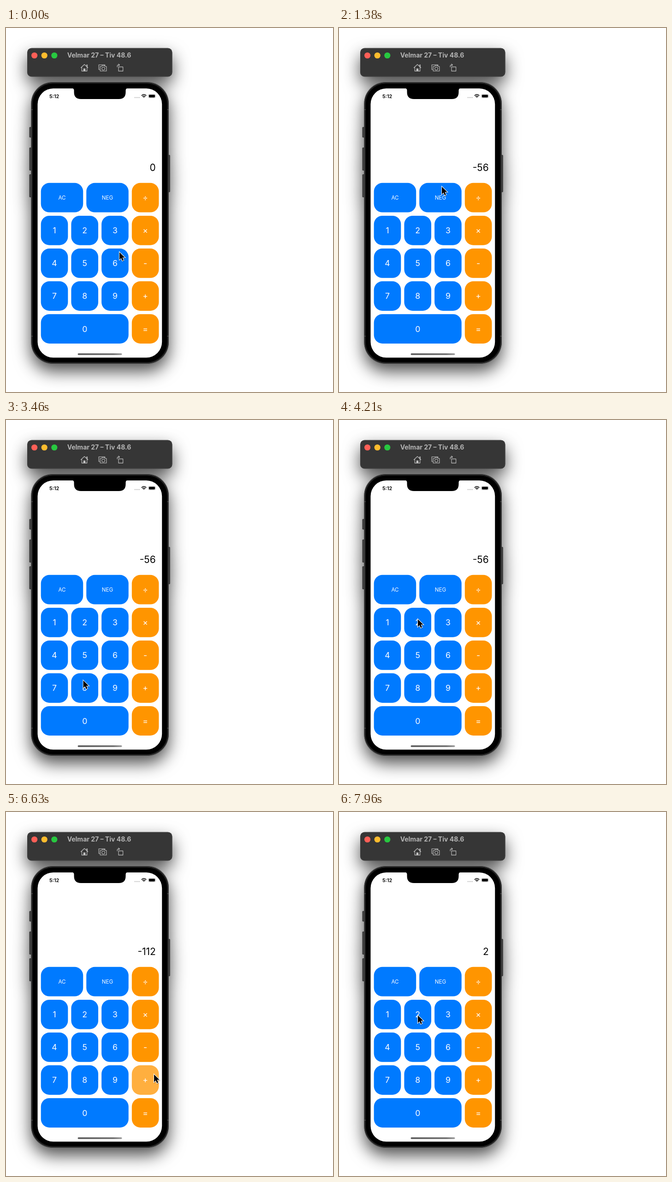
These frames come from a looping animation (709 px wide and 789 px high, 8000 ms). An HTML page:

```html
<!DOCTYPE html>
<html lang="en">
<head>
<meta charset="utf-8">
<title>Calculator</title>
<style>
html, body { margin: 0; width: 100%; height: 100%; overflow: hidden; background: #fff; }
svg { display: block; width: 709px; height: 789px; font-family: Inter, Roboto, sans-serif; }
.key text { fill: #fff; text-anchor: middle; }
.icon { fill: none; stroke: #c4c4c4; stroke-width: 1.1; stroke-linejoin: round; }
</style>
</head>
<body>
<svg viewBox="0 0 709 789">
  <defs>
    <filter id="shadow" filterUnits="userSpaceOnUse" x="-60" y="-20" width="540" height="860">
      <feDropShadow dx="0" dy="16" stdDeviation="18" flood-color="#000" flood-opacity=".7"/>
    </filter>
    <linearGradient id="bar">
      <stop offset="0" stop-color="#555"/>
      <stop offset=".8" stop-color="#6a6a6a"/>
      <stop offset="1" stop-color="#999"/>
    </linearGradient>
  </defs>

  <g filter="url(#shadow)">
    <rect x="46" y="43.5" width="314.5" height="62" rx="9.5" fill="#222"/>
    <g fill="#3c3c3c" stroke="#252525" stroke-width=".8">
      <rect x="51" y="215" width="6" height="22" rx="1"/>
      <rect x="51" y="259.5" width="6" height="49" rx="1"/>
      <rect x="51" y="317.5" width="6" height="49" rx="1"/>
      <rect x="350" y="275.5" width="5.2" height="80" rx="1"/>
    </g>
    <rect x="54.3" y="117" width="298.7" height="611" rx="47" fill="#333"/>
  </g>

  <!-- window bar -->
  <rect x="46.8" y="44.4" width="312.9" height="60.3" rx="8.8" fill="#363636" stroke="#4a4a4a" stroke-width=".8"/>
  <circle cx="61.6" cy="59.5" r="6.6" fill="#ff5f57"/>
  <circle cx="83.2" cy="59.5" r="6.6" fill="#febc2e"/>
  <circle cx="104.8" cy="59.5" r="6.6" fill="#28c840"/>
  <text x="202" y="64" text-anchor="middle" font-size="14" font-weight="700" fill="#b5b5b5">Velmar 27 – Tiv 48.6</text>
  <g class="icon">
    <path d="M162 86.5 170 79 178 86.5M164.3 85V93.4H175.7V85M174.8 83V79.8H176.3V84.4"/>
    <path d="M168.3 93V88.2H171.7V93Z" fill="#c4c4c4"/>
    <path d="M203.6 90H201.2V79.7H214.5V82"/>
    <path d="M204.2 83.2H207.2L208.6 81.4H213.4L214.8 83.2H217.8V93.2H204.2Z"/>
    <circle cx="211" cy="88" r="3.2"/>
    <path d="M244 84.4H253.6V93.4H244ZM241.2 85V82.4Q241.2 80 243.6 80H246M243.6 77.6 246.2 80 243.6 82.4"/>
  </g>

  <!-- phone -->
  <rect x="55" y="117.7" width="297.3" height="609.6" rx="46.3" fill="#000" stroke="#555" stroke-width="1.2"/>
  <rect x="57" y="119.6" width="293.3" height="605.8" rx="44.4" fill="#000" stroke="#252525" stroke-width="1.6"/>
  <path d="M54.3 177H58M349.5 177H353M54.3 668H58M349.5 668H353" stroke="#666"/>
  <rect x="68.5" y="131" width="269.7" height="583.5" rx="34" fill="#fff"/>
  <path d="M143 130.5Q147.5 131 147.5 135.5V139Q147.5 154 162.5 154H244.5Q259.5 154 259.5 139V135.5Q259.5 131 264 130.5Z"/>

  <!-- status row -->
  <text x="94" y="152" font-size="10.8" font-weight="600">5:12</text>
  <path d="M278.6 150.8H290" stroke="#bbb" stroke-width="1.9" stroke-dasharray="1.9 1.2"/>
  <g fill="none" stroke="#000" stroke-width="1.7">
    <path d="M293.8 146.6Q299 141.8 304.2 146.6M295.9 148.8Q299 146 302.1 148.8"/>
    <path d="M297.5 149.8 299 151.6 300.5 149.8Q299 148.7 297.5 149.8Z" fill="#000" stroke="none"/>
  </g>
  <rect x="308.7" y="143.6" width="15.4" height="8" rx="2.4" fill="none" stroke="#aaa" stroke-width=".8"/>
  <rect x="309.9" y="144.8" width="13" height="5.6" rx="1.4"/>
  <path d="M325.1 146.2Q326.2 147.6 325.1 149Z" fill="#aaa"/>

  <text id="display" x="324.6" y="310" text-anchor="end" font-size="20.8">0</text>
  <g id="keys"></g>
  <rect x="155.5" y="705.3" width="96" height="3.5" rx="1.75" fill="url(#bar)"/>

  <g id="cursor">
    <path d="M0 0V16.2L3.7 12.7 6.2 18.6 9 17.4 6.5 11.6H11.7Z" transform="translate(.6 1.6)" fill="#000" opacity=".25" stroke="#000" stroke-width="1.6"/>
    <path d="M0 0V16.2L3.7 12.7 6.2 18.6 9 17.4 6.5 11.6H11.7Z" stroke="#fff" stroke-width="2" paint-order="stroke"/>
  </g>
</svg>
<script>
const LOOP = 8000;
const BLUE = '#007aff', ORANGE = '#ff9500';
const $ = id => document.getElementById(id);
const keys = {};

function addKey(label, x, row, width, size = 17.6) {
  const y = 335.8 + row * 71.1, h = 63.8;
  const color = x > 270 ? ORANGE : BLUE;
  const baseline = y + h / 2 + size * .365;
  $('keys').insertAdjacentHTML('beforeend',
    `<g class="key"><rect x="${x}" y="${y}" width="${width}" height="${h}" rx="18.5" fill="${color}"/>` +
    `<text x="${x + width / 2}" y="${baseline}" font-size="${size}">${label}</text></g>`);
  keys[label] = $('keys').lastChild;
}

const colX = col => 75.7 + col * 65.7;
addKey('AC', colX(0), 0, 91.5, 11.6);
addKey('NEG', 174.2, 0, 91.5, 11.6);
for (let n = 1; n <= 9; n++) addKey(n, colX((n - 1) % 3), Math.ceil(n / 3), 58.6);
addKey(0, colX(0), 4, 190);
[...'÷×-+='].forEach((op, row) => addKey(op, colX(3), row, 58.6));

// time, x, y of the pointer tip
const path = [
  [0, 246, 486], [40, 246, 486], [280, 176, 508], [420, 176, 508], [680, 238, 512],
  [920, 238, 512], [1160, 223, 344], [1710, 223, 344], [2500, 303, 441], [2540, 304, 442],
  [2880, 304, 442], [3500, 166, 566], [3740, 120, 535], [4210, 171, 432], [4380, 171, 432],
  [4760, 300, 645], [4940, 303, 645], [5170, 331, 605], [5210, 381, 527], [5500, 384, 376],
  [6000, 323, 547], [6380, 321, 569], [6720, 321, 569], [7060, 230, 612], [7420, 128, 534],
  [7800, 171, 441], [8000, 171, 441]
];

// key, press time, release time
const presses = [
  [5, 300, 380], [6, 720, 800], ['NEG', 1180, 1260], ['×', 2750, 2830], [2, 4220, 4250],
  ['=', 4800, 4880], ['+', 6620, 6700], [2, 7860, 7900]
];

const readings = [
  [0, '0'], [360, '5'], [790, '56'], [1260, '-56'], [4250, '2'], [4880, '-112'], [7900, '2']
];

const clamp = v => Math.min(1, Math.max(0, v));
const FADE = 60, DIM = .25;

function pointer(t) {
  const i = path.findIndex(p => p[0] > t);
  const [t0, x0, y0] = path[i - 1], [t1, x1, y1] = path[i];
  const u = (t - t0) / (t1 - t0), e = u * u * (3 - 2 * u);
  return [x0 + (x1 - x0) * e, y0 + (y1 - y0) * e];
}

function draw(now) {
  const t = now % LOOP;
  $('cursor').setAttribute('transform', `translate(${pointer(t)})`);
  $('display').textContent = readings.filter(r => r[0] <= t).pop()[1];
  for (const label in keys) {
    const press = presses.find(p => p[0] == label && t >= p[1] && t < p[2] + FADE);
    const dim = press ? DIM * (1 - clamp((t - press[2]) / FADE)) : 0;
    keys[label].setAttribute('opacity', 1 - dim);
  }
}

const start = performance.now();
function tick() {
  draw(performance.now() - start);
  requestAnimationFrame(tick);
}
tick();
</script>
</body>
</html>
```
